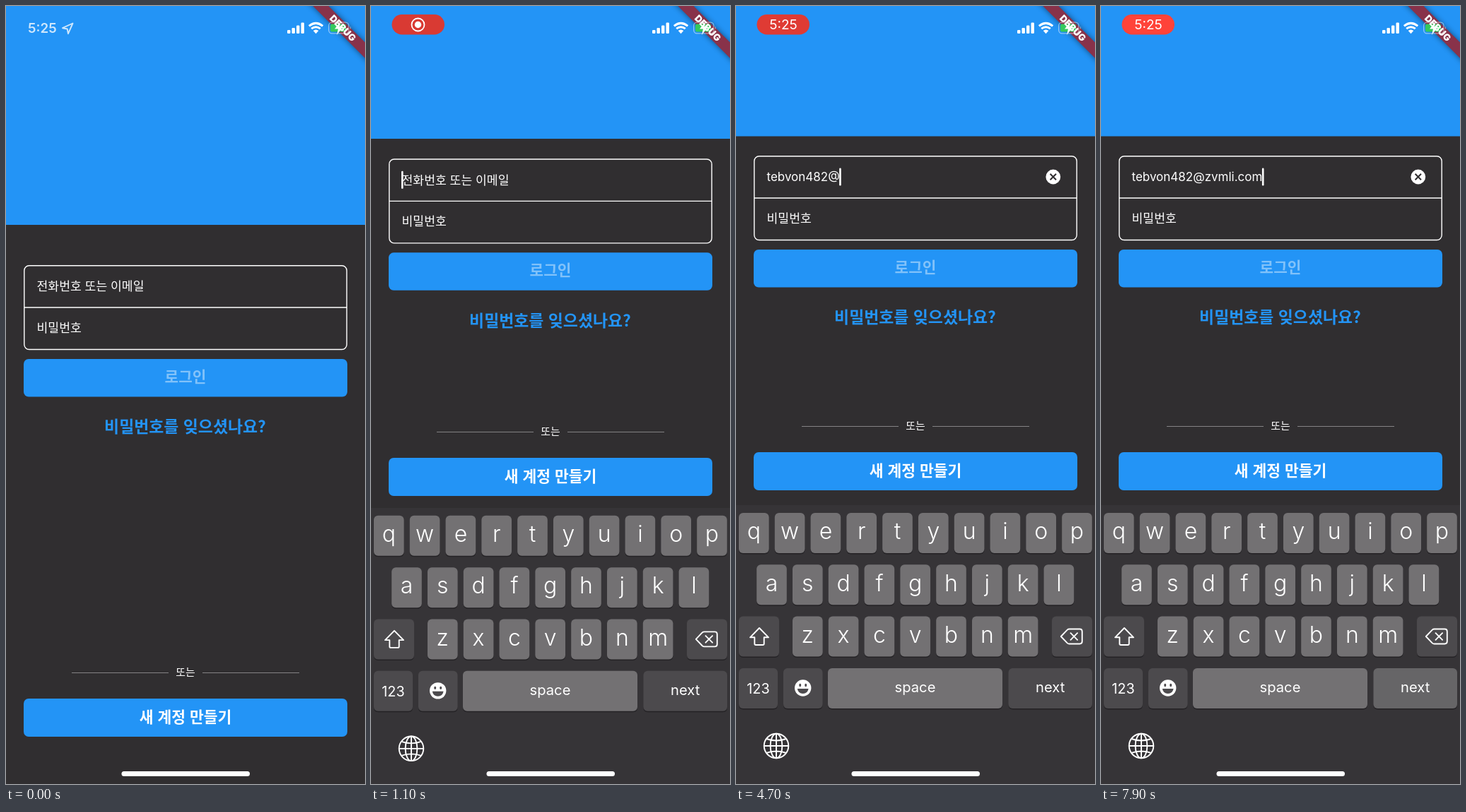
Write an HTML page that moves like this. It is 508 px wide and 1102 px high and loops after 8 s.

```html
<!DOCTYPE html>
<html lang="ko">
<head>
<meta charset="utf-8">
<title>Login</title>
<style>
  html, body { margin: 0; width: 100%; height: 100%; overflow: hidden; background: #302e30; }
  svg { display: block; width: 508px; height: 1102px; }
  text { fill: #fff; font-family: Inter, "Noto Sans CJK KR", "Noto Sans KR", "Noto Sans CJK", sans-serif; white-space: pre; }
  .ko { font-family: "Noto Sans CJK KR", "Noto Sans KR", "Noto Sans CJK", sans-serif; }
  .mid { text-anchor: middle; }
  .bold { font-weight: 700; }
  .blue { fill: #2394f6; }
  .line { fill: none; stroke: #fff; }
  .key rect { fill: #fff; fill-opacity: .3; }
  .key .shade { fill: #18171a; fill-opacity: .6; }
  .fn rect { fill-opacity: .11; }
  .key.down rect { fill-opacity: .11; }
  .fn.down rect { fill-opacity: .24; }
  .key .shade, .key.down .shade { fill-opacity: .6; }
</style>
</head>
<body>
<svg viewBox="0 0 508 1102" xmlns="http://www.w3.org/2000/svg">
  <defs>
    <linearGradient id="glow" x2="0" y2="1">
      <stop offset="0" stop-color="#2394f6" stop-opacity=".2"/>
      <stop offset="1" stop-color="#2394f6" stop-opacity="0"/>
    </linearGradient>
    <filter id="soft" x="-20%" y="-100%" width="140%" height="300%"><feGaussianBlur stdDeviation="4"/></filter>
  </defs>
  <rect width="508" height="1102" fill="#302e30"/>
  <rect id="header" width="508" height="310" class="blue"/>

  <g id="form">
    <rect x="25.8" y=".7" width="456.4" height="118.8" rx="7" class="line" stroke-width="1.4"/>
    <path d="M26 60H482" class="line" stroke-width="1.4"/>
    <text id="hint" class="ko" x="43.5" y="36.3" font-size="17.2">전화번호 또는 이메일</text>
    <text id="email" x="43.5" y="36" font-size="17"></text>
    <rect id="caret" y="17.5" width="2.6" height="25" rx="1.2" fill="#fff"/>
    <g id="clear">
      <circle cx="448.8" cy="30" r="10.4" fill="#fff"/>
      <path d="M444.6 25.8l8.4 8.4m0-8.4l-8.4 8.4" stroke="#302e30" stroke-width="2"/>
    </g>
    <text class="ko" x="43.5" y="94.8" font-size="17.2">비밀번호</text>
    <rect x="25" y="133" width="458" height="53.5" rx="7" class="blue"/>
    <text class="ko mid bold" x="254" y="165.8" font-size="21.3" fill-opacity=".43">로그인</text>
    <text class="ko mid bold" x="253.5" y="237.2" font-size="22.9" style="fill:#2394f6">비밀번호를 잊으셨나요?</text>
  </g>

  <g id="signup">
    <path d="M93 -36.5H230M278 -36.5H415" stroke="#848385"/>
    <text class="ko mid" x="254" y="-32" font-size="14.9">또는</text>
    <rect x="25" width="458" height="54" rx="7" class="blue"/>
    <text class="ko mid bold" x="254" y="33.7" font-size="21.5">새 계정 만들기</text>
  </g>

  <g id="board">
    <rect width="508" height="400" fill="#363437"/>
    <rect id="tint" width="508" height="75" fill="url(#glow)"/>
    <g id="common"></g>
    <g id="letters"></g>
    <g id="symbols"></g>
    <g class="line" stroke-width="1.9">
      <path d="M459.8 186l9-9.4q1.2-1.1 2.8-1.1h14.8q3.4 0 3.4 3.4v14.2q0 3.4-3.4 3.4h-14.8q-1.6 0-2.8-1.1z" stroke-linejoin="round"/>
      <path d="M473.5 181.2l9.6 9.6m0-9.6l-9.6 9.6" stroke-linecap="round"/>
    </g>
    <circle cx="94.7" cy="259" r="11.7" fill="#fff"/>
    <g fill="#4d4b4e">
      <ellipse cx="90.7" cy="255" rx="1.5" ry="2.2"/>
      <ellipse cx="98.7" cy="255" rx="1.5" ry="2.2"/>
      <path d="M86.8 260h15.8q-1.3 7-7.9 7t-7.9-7z"/>
    </g>
    <g class="line" stroke-width="1.9">
      <circle cx="57" cy="341" r="17.3"/>
      <ellipse cx="57" cy="341" rx="8.4" ry="17.3"/>
      <path d="M57 323.7v34.6M39.7 341h34.6M43 331q14 5 28 0M43 351q14-5 28 0"/>
    </g>
  </g>

  <g fill="#fff">
    <g id="bars"></g>
    <path d="M438.5 39.2l-3.8-4.1q3.8-3 7.6 0z"/>
    <g class="line" stroke-width="3">
      <path d="M432.2 32.2q6.3-5 12.6 0"/>
      <path d="M428.8 28.4q9.7-8 19.4 0"/>
    </g>
  </g>

  <g transform="translate(508 0) rotate(45)">
    <rect x="-80" y="36.5" width="160" height="15.6" fill="#000" opacity=".5" filter="url(#soft)"/>
    <rect x="-80" y="36.5" width="160" height="15.6" fill="#88324a"/>
  </g>
  <rect x="456.7" y="23.2" width="28.3" height="15.6" rx="4.6" class="line" stroke-width="1.3" opacity=".5"/>
  <path d="M487 28.5q2 2.500 0 5z" fill="#fff" opacity=".5"/>
  <rect x="459" y="25.5" width="22" height="11" rx="2.6" fill="#35c95c"/>
  <text class="mid" transform="translate(508 0) rotate(45)" y="49" font-size="13.3" font-weight="900">DEBUG</text>
  <path d="M473.500 22l-8.500 10.500h5l-2 8.500 8.500-11h-5z" fill="#fff"/>

  <g id="idle">
    <text x="31" y="38" font-size="18.8" font-weight="600">5:25</text>
    <path d="M94.500 24.500L80 31.200l6.700 1.300 1.300 6.700z" class="line" stroke-width="1.9" stroke-linejoin="round"/>
  </g>
  <g id="live">
    <rect id="pill" x="29.5" y="12" width="74.500" height="28.500" rx="14.2"/>
    <g id="rec">
      <circle cx="66.500" cy="26.500" r="9" class="line" stroke-width="1.8"/>
      <circle cx="66.500" cy="26.500" r="4.700" fill="#fff"/>
    </g>
    <text id="clock" class="mid" x="67" y="33.300" font-size="19">5:25</text>
  </g>
  <rect x="163.500" y="1084" width="181.500" height="7" rx="3.500" fill="#fff"/>
</svg>

<script>
const LOOP = 8000, SHOW = 625;
const $ = id => document.getElementById(id);
const ui = {};
for (const id of ['header', 'form', 'hint', 'email', 'caret', 'clear', 'signup', 'board', 'tint',
  'letters', 'symbols', 'idle', 'live', 'pill', 'rec', 'clock']) ui[id] = $(id);

const clamp = v => Math.max(0, Math.min(1, v));
const ramp = (t, a, b) => clamp((t - a) / (b - a));
const mix = (a, b, p) => a + (b - a) * p;

function add(parent, tag, attrs, text) {
  const el = document.createElementNS('http://www.w3.org/2000/svg', tag);
  for (const k in attrs) el.setAttribute(k, attrs[k]);
  if (text) el.textContent = text;
  return parent.appendChild(el);
}

const keys = [];
function addKey(parent, name, x, row, w, o = {}) {
  const y = 11 + 73.3 * row;
  const g = add(parent, 'g', { class: o.fn ? 'key fn' : 'key' });
  add(g, 'path', { class: 'shade', d: `M${x} ${y + 51}v1q0 6.5 6 6.5h${w - 12}q6 0 6-6.5v-1q0 6-6 6h${12 - w}q-6 0-6-6z` });
  add(g, 'rect', { x, y, width: w, height: 57, rx: 6 });
  if (o.size) add(g, 'text', { class: 'mid', x: x + w / 2, y: y + o.base, 'font-size': o.size, 'font-weight': o.weight || 400 }, name);
  keys.push({ name, el: g, parent });
}

function addRow(parent, chars, x, row, style, w = 42.6, step = 50.8) {
  [...chars].forEach((c, i) => addKey(parent, c, x + i * step, row, w, style));
}

const letter = { size: 32, base: 37.3, weight: 300 };
const sign = { size: 29.5, base: 40, weight: 300 };
addRow(ui.letters, 'qwertyuiop', 4, 0, letter);
addRow(ui.letters, 'asdfghjkl', 29.2, 1, letter);
addRow(ui.letters, 'zxcvbnm', 80, 2, letter);
addKey(ui.letters, 'shift', 4, 2, 57, { fn: true });
add(ui.letters, 'path', { class: 'line', 'stroke-width': 1.9, 'stroke-linejoin': 'round',
  d: 'M33 174l13 13.300h-6.300v9q0 1.700-1.700 1.700h-10q-1.700 0-1.700-1.700v-9H20z' });
addKey(ui.letters, '123', 4, 3, 55, { fn: true, size: 19.8, base: 36 });

addRow(ui.symbols, '1234567890', 4, 0, sign);
addRow(ui.symbols, '-/:;()$&@″', 4, 1, sign);
addRow(ui.symbols, '.,?!′', 80, 2, sign, 62.6, 71.4);
addKey(ui.symbols, '#+=', 4, 2, 57, { fn: true, size: 17, base: 35 });
addKey(ui.symbols, 'ABC', 4, 3, 55, { fn: true, size: 18.6, base: 36 });

addKey($('common'), 'erase', 447, 2, 57, { fn: true });
addKey($('common'), 'emoji', 67, 3, 55.5, { fn: true });
addKey($('common'), 'space', 130, 3, 247, { size: 20.2, base: 34 });
addKey($('common'), 'next', 385.5, 3, 118.5, { fn: true, size: 20.2, base: 34 });

[5, 8, 11.5, 15.5].forEach((h, i) =>
  add($('bars'), 'rect', { x: 398 + i * 6.5, y: 39 - h, width: 4.4, height: h, rx: 1.2 }));

// touch time and key
const taps = [
  [1480, 't'], [1780, 'e'], [2080, 'b'], [2330, 'v'], [2600, 'o'], [2900, 'n'],
  [3080, '123'], [3400, '4'], [3600, '8'], [3850, '2'], [4300, '@'], [4500, 'ABC'],
  [4900, 'z'], [5120, 'v'], [5350, 'm'], [5600, 'l'], [5800, 'i'],
  [6020, '123'], [6260, '.'], [6520, 'ABC'], [6850, 'c'], [7100, 'o'], [7500, 'm'], [7860, 'next']
];

// critically damped spring
function spring(ms) {
  const x = Math.max(0, ms) * 0.014;
  return 1 - (1 + x) * Math.exp(-x);
}

const moveTo = (el, y) => el.setAttribute('transform', `translate(0 ${y.toFixed(2)})`);

function layout(t) {
  const top = spring(t - SHOW - 88);
  const boardY = mix(1102, 707, spring(t - SHOW));
  const signupY = mix(981, 632, spring(t - SHOW - 70));
  ui.header.setAttribute('height', mix(310, 184.5, top));
  moveTo(ui.form, mix(367, 212, top));
  moveTo(ui.signup, signupY);
  moveTo(ui.board, boardY);
  ui.tint.style.opacity = clamp((signupY + 54 - boardY) / 15);
}

function typing(t) {
  let value = '', symbols = false, last = 700, down = '';
  for (const [at, key] of taps) {
    if (at > t) break;
    if (key === '123') symbols = true;
    else if (key === 'ABC') symbols = false;
    else if (key !== 'next') { value += key; last = at; }
    if (t < at + 90 || key === 'next') down = key;
  }
  ui.email.textContent = value;
  ui.hint.style.opacity = value ? 0 : 1;
  ui.clear.style.opacity = value ? 1 : 0;
  ui.letters.style.display = symbols ? 'none' : '';
  ui.symbols.style.display = symbols ? '' : 'none';
  for (const k of keys) k.el.classList.toggle('down', k.name === down);

  const beat = (t - last) % 1000;
  ui.caret.setAttribute('x', 43 + (value ? ui.email.getComputedTextLength() : 0));
  ui.caret.style.opacity = t < 700 ? 0 : 1 - ramp(beat, 480, 580) + ramp(beat, 900, 1000);
}

function status(t) {
  ui.idle.style.opacity = 0.78 * (1 - ramp(t, 0, 300));
  ui.live.style.opacity = ramp(t, 200, 500);
  const glow = clamp(0.5 + 0.75 * Math.cos((t - 50) / 1000 * Math.PI));
  ui.pill.setAttribute('fill', `rgb(${mix(217, 255, glow)},${mix(58, 67, glow)},${mix(51, 57, glow)})`);
  const swap = ramp(t, 3000, 3400);
  ui.rec.style.opacity = 1 - swap;
  ui.clock.style.opacity = swap;
}

const start = performance.now();
function frame() {
  const t = (performance.now() - start) % LOOP;
  layout(t);
  typing(t);
  status(t);
  requestAnimationFrame(frame);
}
frame();
</script>
</body>
</html>
```
